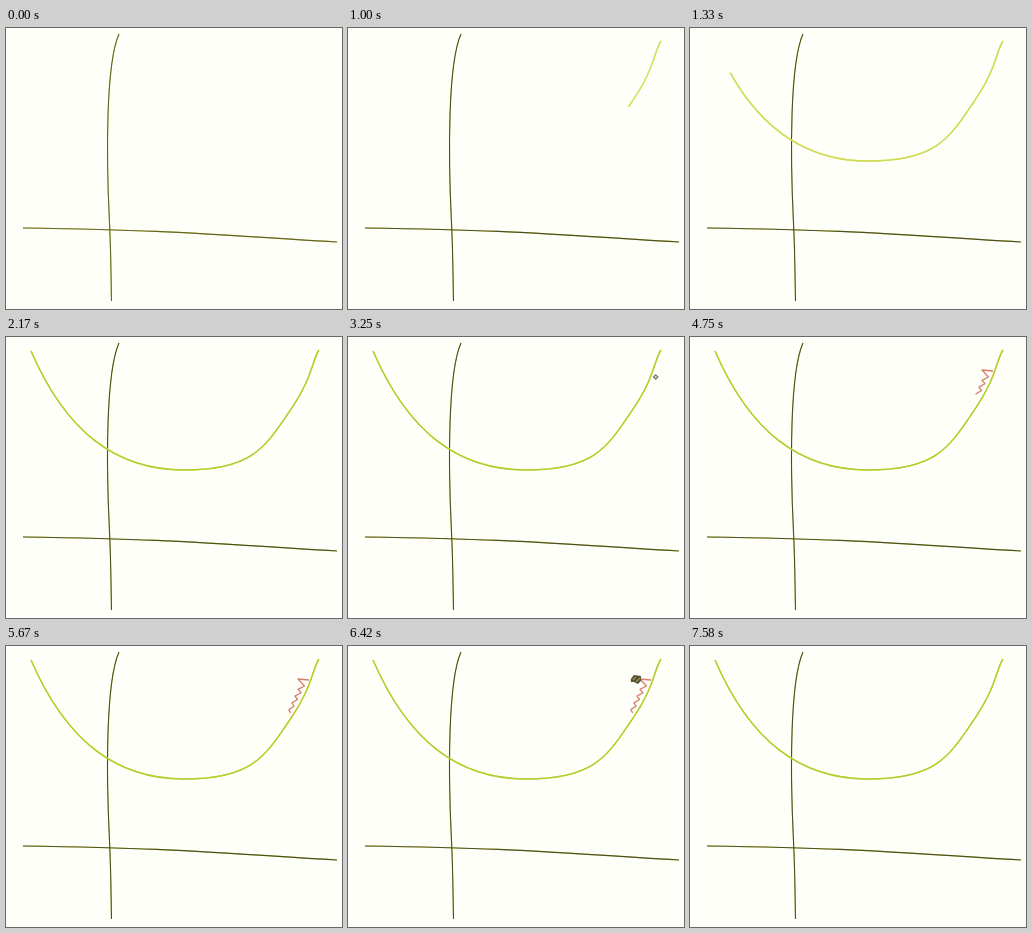
An HTML page for the animation above (8000 ms loop, 336 by 281 pixels).

```html
<!DOCTYPE html>
<html lang="en">
<head>
<meta charset="utf-8">
<title>Sketched curve</title>
<style>
  html, body { margin: 0; width: 100%; height: 100%; overflow: hidden; background: #fffffa; }
  svg { display: block; width: 100vw; height: 100vh; }
  .line { fill: none; stroke-linejoin: round; }
  .soft { filter: drop-shadow(0 0 .6px #dede50); }
</style>
</head>
<body>
<svg viewBox="0 0 336 281">
  <g id="axes" class="line soft" stroke-width="1.1">
    <path d="M113 6C100 35 100 125 103.5 195C105 225 105 250 105.5 273"/>
    <path d="M17 200C150 202 170 204 331 214"/>
  </g>
  <path id="curve" class="line soft" stroke-width="1.4" pathLength="1"
    d="M313 13C306 23 307 42 281 78C258 112 244 133 178 133C110 133 60 95 25 14"/>
  <path id="ledge" class="line" stroke="#d6806c" stroke-width="1.3" pathLength="1"/>
  <g id="marker">
    <path d="M0-3L3 0L0 3L-3 0Z" fill="#77775f"/>
    <circle r="1" fill="#e8e8cc"/>
  </g>
  <g id="walker">
    <path d="M-5-1L-2-5L5-4L5 1L2 4L-2 2L-5 2Z" fill="#54502f"/>
    <path d="M-3 0L0-3M0 2L4-2" stroke="#96945a" stroke-width="1.4"/>
  </g>
</svg>
<script>
const LOOP = 8000, STEP = 1000 / 12;
const el = id => document.getElementById(id);
const clamp = v => Math.max(0, Math.min(1, v));
const ramp = (s, a, b) => clamp((s - a) / (b - a));
const lerp = (a, b, p) => a.map((v, i) => v + (b[i] - v) * p);
const rgb = (a, b, p) => `rgb(${lerp(a, b, p).map(Math.round)})`;

// Flat top, then a zigzag down the slope
function zigzag(turns) {
  let d = 'M303 34L292 33';
  for (let i = 0; i <= turns; i++) {
    const p = i / turns, swing = i % 2 ? -2.5 : 2.5;
    d += `L${296 - 13 * p + swing * (1 - p / 3)} ${40 + 27 * p}`;
  }
  return d;
}
el('ledge').setAttribute('d', zigzag(8));

function draw(id, p) {
  const path = el(id);
  path.style.display = p > 0 ? '' : 'none';
  path.style.strokeDasharray = p < 1 ? `${p} 2` : 'none';
}

// Visible only between steps a and b
function glide(id, s, a, b, from, to) {
  el(id).style.display = s >= a && s < b ? '' : 'none';
  el(id).setAttribute('transform', `translate(${lerp(from, to, ramp(s, a, b))})`);
}

function render(now) {
  const s = Math.floor((now % LOOP + 4) / STEP);
  el('axes').style.stroke = rgb([98, 100, 46], [76, 78, 38], ramp(s, 0, 8));
  el('curve').style.stroke = rgb([216, 226, 104], [180, 204, 48], ramp(s, 12, 26));
  draw('curve', clamp((s - 11) * 0.183));
  draw('ledge', ramp(s, 46, 60));
  el('ledge').style.opacity = 1 - ramp(s, 87, 91);
  glide('marker', s, 31, 43, [315, 12], [304, 54]);
  glide('walker', s, 72, 81, [309, 18], [271, 47]);
}

const start = performance.now();
function tick() {
  render(performance.now() - start);
  requestAnimationFrame(tick);
}
tick();
</script>
</body>
</html>
```
